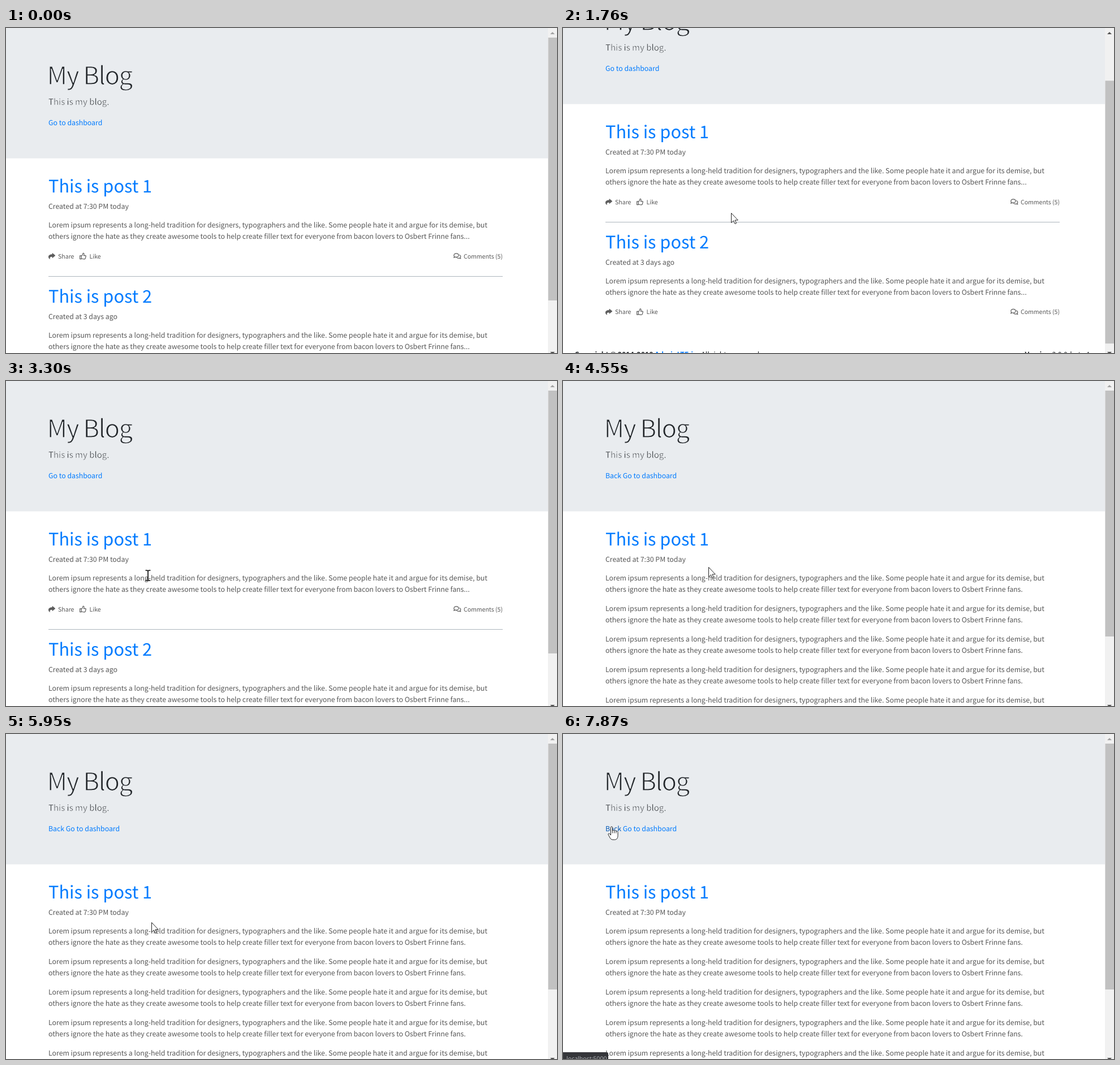
Recreate the animation shown at these times as an HTML page. Size 974x575 px, loop 8 s.

```html
<!DOCTYPE html>
<html lang="en">
<head>
<meta charset="utf-8">
<title>My Blog</title>
<style>
  html, body { margin: 0; width: 100%; height: 100%; overflow: hidden; background: #fff; }
  svg { display: block; }
  text {
    font: 12.32px "Noto Sans CJK JP", "Noto Sans CJK SC", "Noto Sans CJK", "Noto Sans", sans-serif;
    text-rendering: geometricPrecision;
    white-space: pre;
    fill: #575757;
  }
  .dark { fill: #212529; }
  /* A background-coloured outline thins the strokes to a light weight. */
  .display { font-size: 44px; letter-spacing: -1.6px; stroke: #e9ecef; stroke-width: 1.4; }
  .lead { font-size: 15px; stroke: #e9ecef; stroke-width: .55; }
  .title { font-size: 30.7px; }
  .small { font-size: 10.55px; }
  .link { fill: #007bff; }
  .link.hover { fill: #0056b3; }
  .end { text-anchor: end; }
  .bold { font-weight: 700; }
  .icon { fill: none; stroke: #5c5c5c; stroke-width: 1.2; stroke-linejoin: round; }
  .icon.solid { fill: #5c5c5c; stroke-width: .8; }
  .pointer { fill: #fff; stroke: #222; stroke-width: 1; stroke-linejoin: round; }
  #status text { font: 10.6px "Open Sans", sans-serif; fill: #b4b7bb; }
</style>
</head>
<body>
<svg id="stage" width="974" height="575" viewBox="0 0 974 575"></svg>
<script>
const LOOP = 8000;
const LINE = 20.25;
const PARAGRAPH = 54;
const POST_PITCH = 194.6;
const LOREM = [
  "Lorem ipsum represents a long-held tradition for designers, typographers and the like. Some people hate it and argue for its demise, but",
  "others ignore the hate as they create awesome tools to help create filler text for everyone from bacon lovers to Osbert Frinne fans"
];

const text = (x, y, content, cls = "") => `<text x="${x}" y="${y}" class="${cls}">${content}</text>`;
const icon = (x, y, d, cls = "") => `<path class="icon ${cls}" transform="translate(${x} ${y})" d="${d}"/>`;

const header = links => `
  <rect width="958" height="230.6" fill="#e9ecef"/>
  ${text(72.5, 100, "My Blog", "dark display")}
  ${text(75, 136, "This is my blog.", "dark lead")}
  ${text(75, 171.6, links, "link")}`;

const postTitle = (y, n, day, id) =>
  `<text x="75" y="${y}" class="link title" ${id ? `id="${id}"` : ""}>This is post ${n}</text>` +
  text(75, y + 29, `Created at ${day}`);

const paragraph = (y, ending) =>
  text(75, y, LOREM[0]) + text(75, y + LINE, LOREM[1] + ending);

const actions = y =>
  icon(75, y - 10, "M7 1L12 5 7 9V6.8C3.5 6.8 1.6 7.6 2.5 11 0 9.5-.3 6 1.5 4.6 2.7 3.5 4.8 3.2 7 3.2Z", "solid") +
  text(92, y, "Share", "small") +
  icon(130, y - 10, "M.6 5.2H3.2V11H.6ZM3.5 5.8C5 4.6 5.6 3.4 5.8 1.6 6 .2 8 .4 8 2.4 8 3.6 7.5 4.2 7.4 5H10.2C11.6 5 11.6 6.6 10.8 7 11.2 8 10.9 8.6 10.4 8.9 10.5 10.6 9.8 11.2 8.2 11.2 6 11.2 5 10.6 3.5 10.3") +
  text(147.5, y, "Like", "small") +
  icon(791, y - 9.5, "M.6 8.2L1.7 6.3C-.4 4 1.2.7 4.8.7S9 2.4 9 4 7.4 7.3 4.8 7.3L3.2 7.1ZM10 3.4C13.2 4 13.3 6.8 11.9 8L12.8 9.9 10.3 9.1C8.2 9.6 6.4 9.1 5.5 7.9") +
  text(878, y, "Comments (5)", "small end");

const divider = y => `<rect x="75" y="${y}" width="803" height="1" fill="#adb5bd"/>`;

const footer = y =>
  text(20.5, y, `<tspan class="bold">Copyright © 2014-2018 <tspan class="link">AdminLTE.io</tspan>.</tspan> All rights reserved.`, "dark") +
  text(932, y, `<tspan class="bold">Version</tspan> 3.0.0-beta.1`, "dark end");

const summary = (y, n, day, id) =>
  postTitle(y, n, day, id) + paragraph(y + 62.1, "...") + actions(y + 116.6);

const blogPage =
  header(`<tspan class="link" id="dash">Go to dashboard</tspan>`) +
  summary(291, 1, "7:30 PM today", "title") +
  divider(439) +
  summary(291 + POST_PITCH, 2, "3 days ago") +
  footer(678.3);

const postPage =
  header(`<tspan class="link" id="back">Back</tspan> Go to dashboard`) +
  postTitle(291, 1, "7:30 PM today") +
  [0, 1, 2, 3, 4].map(i => paragraph(353.1 + i * PARAGRAPH, ".")).join("") +
  actions(623.6) + divider(655) + footer(725.3);

const pointers = {
  arrow: `<path class="pointer" d="M.5.5V17.5L4.4 13.9 7 19.5 9.5 18.4 6.9 13H12.3Z"/>`,
  hand: `<path class="pointer" d="M-1.6 1.2C-1.6-.5 1.4-.5 1.4 1.2V7.2C2 6 4.6 6 4.6 7.6 5.3 6.4 7.8 6.7 7.8 8.4 8.6 7.4 11 7.9 11 9.8V15.5C11 20 9 23 5.5 23H1.8C-1.2 23-2.6 20.5-3.8 18L-6 14C-6.6 12-4.2 11.4-3.2 12.8L-1.6 15Z"/>
         <path d="M1.4 7V11.5M4.6 8V11.5M7.8 9V11.5" stroke="#222" fill="none"/>`,
  beam: `<path d="M-4.5-9H-1.5L0-8 1.5-9H4.5M0-8V8M-4.5 9H-1.5L0 8 1.5 9H4.5" fill="none" stroke="#111" stroke-width="1.7"/>`
};

document.getElementById("stage").innerHTML = `
  <g id="blog">${blogPage}</g>
  <g id="post">${postPage}</g>
  <rect x="958" width="16" height="575" fill="#f1f1f1"/>
  <rect id="thumb" x="958.5" width="15.5" fill="#c1c1c1"/>
  <path id="up" d="M962 11L966 7 970 11Z"/>
  <path id="down" d="M962 573L966 577 970 573Z"/>
  <g id="status">
    <path id="statusBox" fill="#35363a"/>
    <text id="statusText" y="577.5" class="end"></text>
  </g>
  <g id="cursor">${Object.entries(pointers).map(([k, p]) => `<g id="${k}">${p}</g>`).join("")}</g>`;

const el = id => document.getElementById(id);
const show = (id, on) => el(id).setAttribute("display", on ? "inline" : "none");

const pages = {
  blog: { max: 107, thumb: 465 },
  post: { max: 154, thumb: 435 }
};

// time, page, scroll offset
const views = [
  [0, "blog", 0], [1760, "blog", 96], [1840, "blog", 107], [2840, "blog", 30], [2920, "blog", 0],
  [4070, "post", 0], [4950, "post", 113], [5020, "post", 148], [5090, "post", 154], [5950, "post", 0]
];

// time, x, y, pointer, hovered link
const moves = [
  [150, 785, 528, "arrow"], [500, 450, 290, "arrow"], [800, 190, 105, "arrow"],
  [920, 168, 140, "arrow"], [1070, 165, 168, "hand", "dash"], [1220, 164.5, 173.5, "hand", "dash"],
  [1390, 164.5, 173.5, "hand", "dash"], [1460, 190, 200, "arrow"], [1700, 300, 330, "arrow"],
  [2610, 343, 389, "arrow"], [2685, 365, 397, "arrow"], [3000, 365, 397, "arrow"],
  [3160, 300, 368, "beam"], [3225, 251, 344, "beam"], [3310, 251, 344, "beam"],
  [3380, 190, 300, "arrow"], [3430, 150, 285, "hand", "title"], [3620, 84, 270, "hand", "title"],
  [3840, 84, 270, "hand", "title"], [4070, 130, 282, "hand"], [4280, 200, 302, "arrow"],
  [4535, 257, 329, "arrow"], [5390, 257, 329, "arrow"], [5460, 254, 322, "arrow"],
  [5540, 257, 333, "arrow"], [6400, 257, 333, "arrow"], [6560, 225, 296, "hand"],
  [6760, 160, 255, "arrow"], [7180, 98, 176, "arrow"], [7240, 95, 166, "hand", "back"],
  [7550, 86, 161, "hand", "back"], [7780, 80, 152, "hand", "back"], [7850, 85.5, 163.5, "hand", "back"]
];

// start, end, width, address
const statuses = [
  [3840, 4070, 111, "localhost:5000/post/1"],
  [7400, LOOP, 80, "localhost:5000"]
];

const lastBefore = (list, t) => list.findLastIndex(item => item[0] <= t);

function drawPage(t) {
  const [, name, scroll] = views[lastBefore(views, t)];
  const { max, thumb } = pages[name];
  for (const id in pages) show(id, id === name);
  el(name).setAttribute("transform", `translate(0 ${-scroll})`);
  el("thumb").setAttribute("y", 17 + scroll / max * (550 - thumb));
  el("thumb").setAttribute("height", thumb);
  el("up").setAttribute("fill", scroll > 0 ? "#505050" : "#a3a3a3");
  el("down").setAttribute("fill", scroll < max ? "#505050" : "#a3a3a3");
}

function drawCursor(t) {
  const tick = Math.floor((t + 8) / 77) * 77;
  const i = lastBefore(moves, tick);
  show("cursor", i >= 0);
  const [start, x, y, kind, hovered] = moves[Math.max(i, 0)];
  const [end, nextX, nextY] = moves[i + 1] || [LOOP, x, y];
  const k = Math.max(0, (tick - start) / (end - start));
  el("cursor").setAttribute("transform", `translate(${Math.round(x + (nextX - x) * k)} ${Math.round(y + (nextY - y) * k)})`);
  for (const id in pointers) show(id, id === kind);
  for (const id of ["dash", "title", "back"]) el(id).classList.toggle("hover", i >= 0 && id === hovered);
}

function drawStatus(t) {
  const status = statuses.find(([start, end]) => t >= start && t < end);
  show("status", status);
  if (!status) return;
  const [, , width, address] = status;
  el("statusBox").setAttribute("d", `M0 563H${width - 3}Q${width} 563 ${width} 566V575H0Z`);
  el("statusText").setAttribute("x", width - 2.5);
  el("statusText").textContent = address;
}

function frame(now) {
  const t = now % LOOP;
  drawPage(t);
  drawCursor(t);
  drawStatus(t);
  requestAnimationFrame(frame);
}
frame(0);
</script>
</body>
</html>
```
